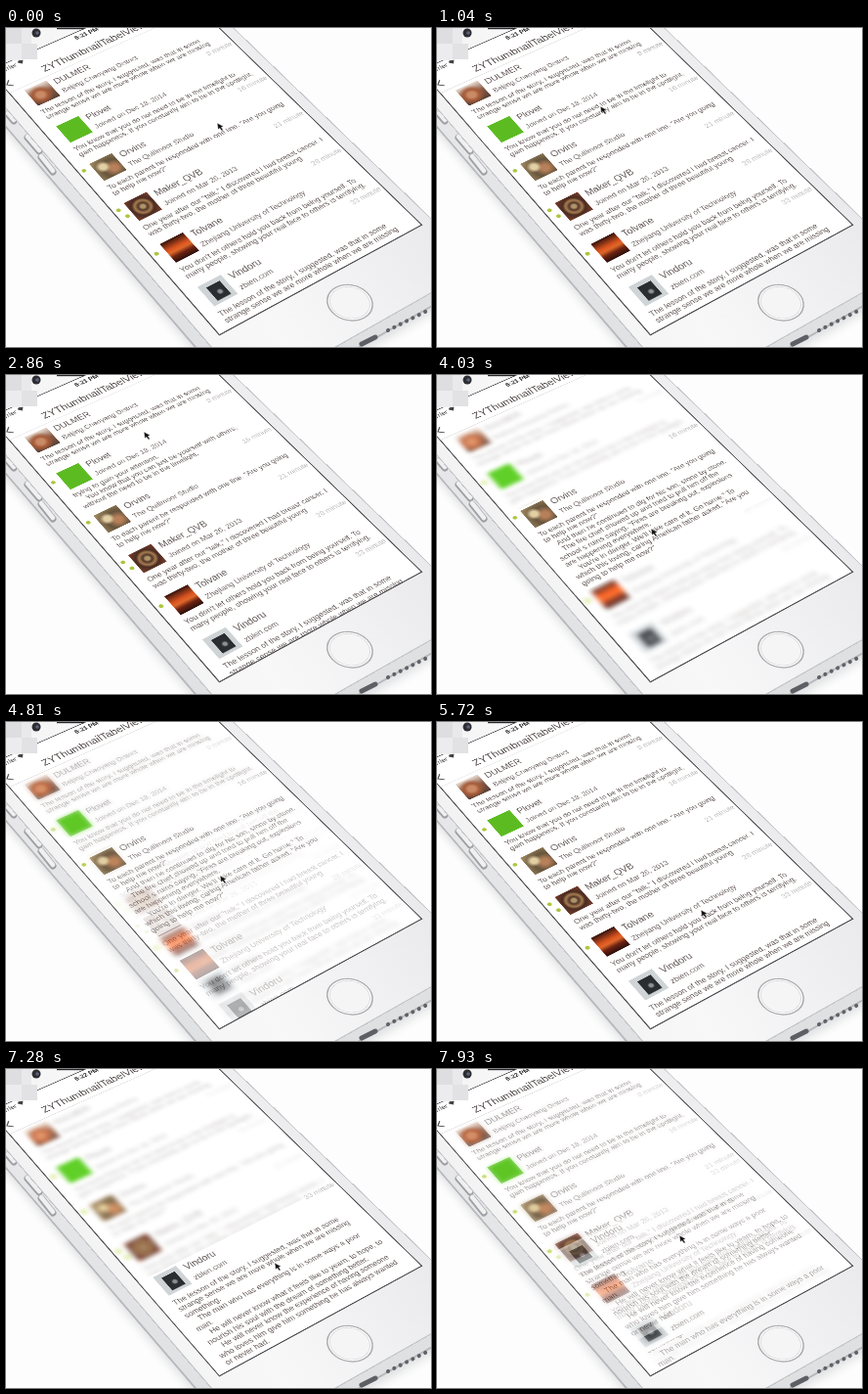
Recreate the animation shown at these times as an HTML page. Size 435 by 326 pixels, loop 8 s.

```html
<!DOCTYPE html>
<html lang="en">
<head>
<meta charset="utf-8">
<title>Expanding list on a phone</title>
<style>
html, body { margin: 0; width: 100%; height: 100%; overflow: hidden; background: #fdfdfd; }
#stage { position: absolute; left: 0; top: 0; width: 435px; height: 326px; overflow: hidden;
  background: #fdfdfd; font-family: "Liberation Sans", Arial, sans-serif; color: #655a58;
  --tilt: matrix3d(.5499,-.23592,0,.00014502, .33196,.36792,0,-.00021458, 0,0,1,0, 38,88,0,1); }
#stage div, #stage span { position: absolute; }
svg { position: absolute; left: 0; top: 0; }
.plane { left: 0; top: 0; width: 0; height: 0; transform-origin: 0 0; transform: var(--tilt); }
.side { transform: translate(-3px,16px) var(--tilt); }
.body { left: -44px; top: -215px; width: 421px; height: 827px; border-radius: 60px; }
.side .body { background: linear-gradient(#e9e9eb, #dfe0e2); box-shadow: inset 0 0 0 3px #b9babd, -4px 8px 16px #dddee0; }
.face { background: linear-gradient(100deg, #f1f1f2, #f8f8f9 40%, #e9e9eb); box-shadow: inset 0 0 0 2px #c6c7ca; }
.home { left: 138px; top: 527px; width: 63px; height: 63px; border: 2.5px solid #a9aaac; border-radius: 50%;
  background: #f5f5f6; box-shadow: inset 0 0 0 2px #fff, inset 0 0 0 3px #cfcfd2; }
#screen { left: -22px; top: -133px; width: 375px; height: 635px; border: 2px solid #56565a; background: #fff; overflow: hidden; }
#page { left: 20px; top: 131px; width: 0; height: 0; }
#page span { white-space: pre; line-height: normal; }
.sheet { left: -20px; top: -70px; width: 375px; height: 580px; overflow: hidden; background: #fff; }
.sheet > .rows { left: 20px; top: 70px; }
#blurred .rows { filter: blur(4.5px) saturate(1.4); opacity: .85; }
#blurred .text, #blurred span { opacity: .5; }
.row { left: 0; width: 355px; }
.pic { left: 3px; top: -62px; width: 42px; height: 42px; }
.dot { width: 7px; height: 7px; border-radius: 50%; background: #adc63f; }
.text { left: 0; top: -11.5px; width: 355px; height: 29px; overflow: hidden; }
.text div { white-space: pre; font-size: 13px; line-height: 14.5px; }
.back { left: -20px; width: 375px; background: #fff; }
#head { left: -20px; top: -131px; width: 375px; height: 61px; background: #fff; border-bottom: 1px solid #d6d6d8; }
#head > div { left: 20px; top: 131px; }
#wifi { left: 27px; top: -126px; width: 11px; height: 10px; background: #444;
  clip-path: polygon(50% 100%, 0 30%, 25% 8%, 50% 0, 75% 8%, 100% 30%); }
#chevron { left: -13px; top: -94px; width: 10px; height: 10px; border: solid #555; border-width: 0 0 2px 2px; transform: rotate(45deg); }
.icon { font-family: "DejaVu Sans", sans-serif; }
</style>
</head>
<body>
<div id="stage">
  <div class="plane side"><div class="body"></div></div>
  <svg width="435" height="326">
    <g stroke-linecap="round" fill="none">
      <path d="M2 88l6 7M22 112l12 14M36 132l12 15" stroke="#9fa0a4" stroke-width="7"/>
      <path d="M2 87l6 7M22 111l12 14M36 131l12 15" stroke="#f0f0f1" stroke-width="4.5"/>
      <path d="M364 323l14-7" stroke="#5d5f65" stroke-width="5"/>
      <path d="M391 309L435 287" stroke="#606268" stroke-width="4" stroke-dasharray="0.1 7"/>
    </g>
  </svg>
  <div class="plane">
    <div class="body face"></div>
    <div class="home"></div>
    <div id="screen"><div id="page"></div></div>
  </div>
  <svg width="435" height="326">
    <circle cx="31" cy="5" r="4.5" fill="#2d2d32"/><circle cx="32" cy="5" r="1.8" fill="#5a6478"/>
    <path d="M52 0h28" stroke="#26262a" stroke-width="2.4"/>
    <path d="M0 0h16v16H0z" fill="#dedee0"/><path d="M16 0h10v16H16z" fill="#e9e9eb"/>
    <path d="M0 16h16v17H0z" fill="#ececee"/><path d="M16 16h16v16H16z" fill="#e2e2e4"/>
    <path id="cursor" d="M0 0l1.3 8 2.1-1.6 2.3 3.2 1.7-1.2-2.2-3 2.6-1.2z" fill="#111" stroke="#fff" stroke-width=".6"/>
  </svg>
</div>
<script>
const LOOP = 8000, PITCH = 96, LINE = 14.5, FADE = 260;
const lesson = `The lesson of the story, I suggested, was that in some
strange sense we are more whole when we are missing
something.
    The man who has everything is in some ways a poor
man.
    He will never know what it feels like to yearn, to hope, to
nourish his soul with the dream of something better.
    He will never know the experience of having someone
who loves him give him something he has always wanted
or never had.`;
const spotlight = `You know that you do not need to be in the limelight to
gain happiness. If you constantly aim to be in the spotlight,
you are looking to others for validation.
    in actuality, you should just be yourself. People do not
like characters that are always in your line of vision and
trying to gain your attention.
    You know that you can just be yourself with others,
without the need to be in the limelight.
    People will see you as a beautiful girl when you are being
you, not trying to persistently have all attention on you.
Who can have a real conversation with someone who is
eagerly looking around and making sure all eyes are on
them?`;
const rescue = `To each parent he responded with one line. "Are you going
to help me now?"
    And then he continued to dig for his son, stone by stone.
    The fire chief showed up and tried to pull him off the
school s ruins saying, "Fires are breaking out, explosions
are happening everywhere.
    You're in danger. We'll take care of it. Go home." To
which this loving, caring American father asked, "Are you
going to help me now?"`;
const people = [
  { name: 'DULMER', sub: 'Beijing,Chaoyang District', time: '5 minute', text: lesson, dots: [],
    pic: 'radial-gradient(circle at 40% 55%, #c98a66 0 18%, #a65b38 36%, transparent 62%), linear-gradient(#e9dcd2, #8a5a44 50%, #5a4238)' },
  { name: 'Plovet', sub: 'Joined on Dec 18, 2014', time: '8 minute', text: spotlight, dots: [-48],
    pic: '#5dbb22' },
  { name: 'Orvins', sub: 'The Quillmoor Studio', time: '16 minute', text: rescue, dots: [-55],
    pic: 'radial-gradient(circle at 35% 40%, #e2cfa4 0 14%, transparent 32%), radial-gradient(circle at 68% 65%, #b8805a 0 14%, #65543c 45%, #a68d64)' },
  { name: 'Maker_QVB', sub: 'Joined on Mar 26, 2013', time: '21 minute', dots: [-55, -38],
    text: 'One year after our "talk," I discovered I had breast cancer. I\nwas thirty-two, the mother of three beautiful young',
    pic: 'radial-gradient(circle, #b0936a 0 12%, #4e3426 24%, #a87c50 42%, #4a2c22 58%, #7d3f2c)' },
  { name: 'Tolvane', sub: 'Zhejiang University of Technology', time: '28 minute', dots: [-50],
    text: "You don't let others hold you back from being yourself. To\nmany people, showing your real face to others is terrifying.",
    pic: 'linear-gradient(#35140d, #d9531f 40%, #e0682a 55%, #6b2211 75%, #2d100b)' },
  { name: 'Vindoru', sub: 'zbien.com', time: '33 minute', text: lesson, dots: [],
    pic: 'radial-gradient(circle at 55% 58%, #8b9195 0 8%, transparent 16%), linear-gradient(#2b2e31, #2b2e31) 58% 60%/58% 68% no-repeat, #cfd4d6' }
];

const page = document.getElementById('page');
function add(parent, cls) {
  const el = document.createElement('div');
  el.className = cls;
  parent.append(el);
  return el;
}
// Text placed by its baseline
function label(parent, x, y, size, color, text, right) {
  const el = document.createElement('span');
  el.textContent = text;
  el.style.cssText = `top:${y - size * .905}px;font-size:${size}px;color:${color};` +
    (right ? `right:${355 - x}px` : `left:${x}px`);
  parent.append(el);
  return el;
}
function makeRow(parent, p) {
  const row = add(parent, 'row');
  add(row, 'pic').style.background = p.pic;
  const dots = p.dots.map((y, i) => {
    const d = add(row, 'dot');
    d.style.left = (i ? -10 : -15) + 'px';
    d.style.top = y - 3 + 'px';
    return d;
  });
  label(row, 54, -46, 16, '#5f5553', p.name);
  label(row, 54, -23, 13, '#6f6462', p.sub);
  label(row, 351, -62, 13, '#bfbbbb', p.time, true);
  const box = add(row, 'text'), body = add(box, '');
  body.textContent = p.text;
  return { row, box, body, dots, lines: p.text.split('\n').length };
}
function makeList(id) {
  const sheet = add(page, 'sheet');
  sheet.id = id;
  const rows = add(sheet, 'rows');
  return { sheet, rows: people.map(p => makeRow(rows, p)) };
}
const list = makeList('list'), blurred = makeList('blurred');
blurred.rows.forEach((r, i) => r.row.style.top = i * PITCH + 'px');

function makeTool(parent, x, color, icon, text) {
  label(parent, x, -86, 14, color, icon).className = 'icon';
  label(parent, x + 15, -86, 13.5, color, text);
}
// to: baseline when opened; pull: toolbar drag; drift: slide while fading
const cards = [
  { who: 1, open: 1040, close: 2600, to: 96, pull: 48, drift: -48 },
  { who: 2, open: 3480, close: 4720, to: 192, pull: 0, drift: 0 },
  { who: 5, open: 6440, close: 7800, to: 366, pull: 0, drift: -124 }
].map(c => {
  const holder = add(page, ''), back = add(holder, 'back'), tools = add(holder, '');
  if (c.pull) {
    makeTool(tools, -10, '#8fba35', '☑', 'Mark as Unread');
    makeTool(tools, 150, '#9b9696', '☆', 'Favorite');
    makeTool(tools, 275, '#9b9696', '⋖', 'Sharing');
  }
  return { ...c, holder, back, tools, ...makeRow(holder, people[c.who]) };
});

const bar = add(page, ''), head = add(bar, '');
bar.id = 'head';
label(head, -14, -116, 12, '#444', 'Carrier');
add(head, '').id = 'wifi';
const clock = label(head, 138, -116, 12, '#333', '');
clock.style.fontWeight = 'bold';
label(head, 53, -80, 19.3, '#514948', 'ZYThumbnailTabelView');
add(head, '').id = 'chevron';

const path = [[0, 219, 101], [900, 176, 87], [1150, 166, 82], [1400, 160, 68], [1690, 168, 78],
  [2200, 86, 97], [2420, 86, 97], [2860, 144, 62], [3450, 207, 128], [4030, 222, 161], [4850, 222, 161],
  [5720, 273, 196], [6400, 300, 222], [6760, 300, 225], [7500, 272, 196], [7930, 251, 174], [8000, 249, 172]];
const unit = v => Math.min(1, Math.max(0, v));
const ease = v => (v = unit(v), v * v * (3 - 2 * v));
const cursor = document.getElementById('cursor');

function moveCursor(t) {
  const i = Math.max(1, path.findIndex(p => p[0] > t));
  const [t0, x0, y0] = path[i - 1], [t1, x1, y1] = path[i];
  const k = ease((t - t0) / (t1 - t0));
  cursor.setAttribute('transform', `translate(${x0 + (x1 - x0) * k - 3} ${y0 + (y1 - y0) * k - 4}) scale(.85)`);
}

function draw(t) {
  let veil = 0, grown = -1, extra = 0;
  for (const c of cards) {
    const a = ease((t - c.open) / FADE), k = unit((t - c.close) / FADE);
    const shown = t >= c.open && k < 1;
    c.holder.style.display = shown ? 'block' : 'none';
    if (t >= c.close && t < c.close + 420) {
      grown = c.who;
      extra = k < 1 ? 12 + 60 * (1 - k) : 12 * (1 - ease((t - c.close - FADE) / 160));
    }
    if (!shown) continue;
    const start = c.who * PITCH, pull = c.pull * ease((t - c.open - 320) / 220);
    const height = 2 * LINE + (c.lines - 2) * LINE * a;
    veil = a * (1 - k);
    c.holder.style.top = start + (c.to - start) * a + pull + c.drift * k + 'px';
    c.holder.style.opacity = 1 - k;
    c.box.style.height = height + 2 + 'px';
    c.back.style.top = -66 - pull + 'px';
    c.back.style.height = height + 60 + pull + 'px';
    c.tools.style.opacity = c.pull ? pull / c.pull : 0;
    if (c.who === 1) c.dots[0].style.opacity = t > 2380 ? 1 : 0;
  }
  blurred.sheet.style.opacity = veil;
  list.rows.forEach((r, i) => {
    const big = i === grown, height = 2 * LINE + (big ? extra : 0);
    r.row.style.top = i * PITCH + (grown >= 0 && i > grown ? extra : 0) + 'px';
    r.box.style.height = height + 'px';
    r.body.style.top = big ? (height - r.lines * LINE) / 2 + 'px' : '0';
  });
  for (const l of [list, blurred]) l.rows[1].dots[0].style.opacity = t > 2380 ? 1 : 0;
  clock.textContent = t < 6200 ? '6:21 PM' : '6:22 PM';
  moveCursor(t);
}
function tick() {
  draw(performance.now() % LOOP);
  requestAnimationFrame(tick);
}
tick();
</script>
</body>
</html>
```
